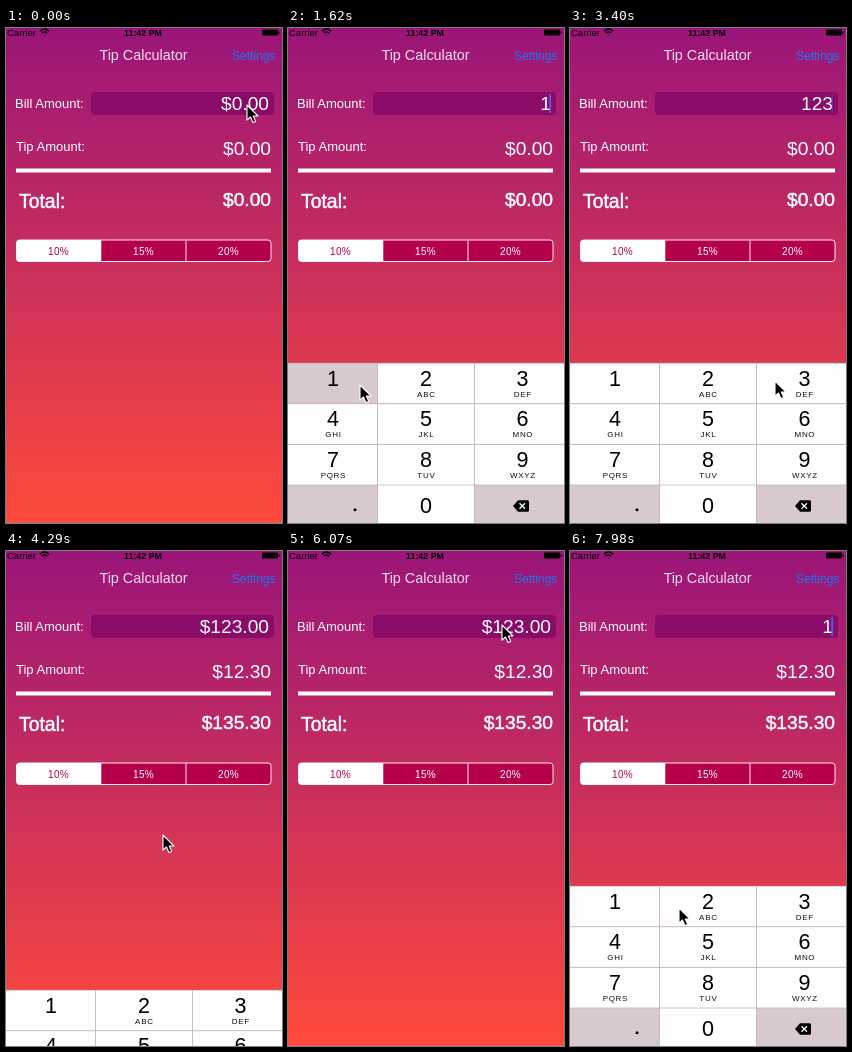
An HTML page that plays this animation: 276x495 px, repeating every 8000 ms.

```html
<!DOCTYPE html>
<html lang="en">
<head>
<meta charset="utf-8">
<title>Tip Calculator</title>
<style>
  html, body { margin: 0; width: 100%; height: 100%; overflow: hidden; background: #d63654; }
  svg { display: block; width: 100%; height: 100%; }
  text { font-family: "Liberation Sans", Arial, sans-serif; fill: #fff; }
  .end { text-anchor: end; font-size: 19.2px; }
  .mid { text-anchor: middle; }
  .medium { stroke: #fff; stroke-width: .5px; }
  .label { font-size: 13px; }
  .seg { font-size: 10px; letter-spacing: .3px; }
  .digit { font-size: 21.5px; fill: #000; }
  .letters { font-size: 8px; letter-spacing: .7px; fill: #111; }
  .status { font-size: 9.5px; fill: #000; }
</style>
</head>
<body>
<svg viewBox="0 0 276 495" preserveAspectRatio="none">
  <defs>
    <linearGradient id="sky" x1="0" y1="0" x2="0" y2="1">
      <stop offset="0" stop-color="#9a1579"/>
      <stop offset=".5" stop-color="#cb305b"/>
      <stop offset="1" stop-color="#ff4a3b"/>
    </linearGradient>
  </defs>
  <rect width="276" height="495" fill="url(#sky)"/>

  <text class="status" x="1" y="7.5">Carrier</text>
  <g fill="none" stroke="#000" stroke-width="1.4">
    <path d="M34 3.2Q38.5-1 43 3.2M35.8 5.2Q38.5 2.8 41.2 5.2"/>
    <circle cx="38.5" cy="7" r=".6" fill="#000" stroke="none"/>
  </g>
  <text class="status mid" x="137" y="7.5" style="font-size:8.9px;font-weight:bold">11:42 PM</text>
  <rect x="256" y="1.5" width="16" height="6" rx="1"/>
  <rect x="272.5" y="3.3" width="1.2" height="2.4" rx=".5"/>

  <text class="mid" x="137.5" y="32" style="font-size:14.4px;fill:#f6dcec">Tip Calculator</text>
  <text x="226" y="31.5" style="font-size:12px;fill:#1a78f0">Settings</text>

  <text class="label" x="9" y="80">Bill Amount:</text>
  <rect x="85" y="64" width="183" height="23" rx="4" fill="#8a0b68"/>
  <text class="end" id="bill" x="263" y="82"></text>
  <rect id="caret" x="261.3" y="66" width="1.7" height="19" fill="#4f62f0"/>

  <text class="label" x="10" y="123">Tip Amount:</text>
  <text class="end" id="tip" x="265" y="127"></text>
  <rect x="10" y="140.5" width="255" height="4" fill="#fff"/>
  <text class="medium" x="13" y="180" style="font-size:19.4px">Total:</text>
  <text class="end medium" id="total" x="265" y="178"></text>

  <rect x="10.5" y="212" width="254.5" height="21.5" rx="3" fill="#b5004b" stroke="#fff" stroke-width=".9"/>
  <path d="M95.3 212H13.5a3 3 0 0 0-3 3v15.5a3 3 0 0 0 3 3H95.3Z" fill="#fff"/>
  <path d="M180 212V233.5" stroke="#fff" stroke-width=".9"/>
  <text class="seg mid" x="52.5" y="226.5" style="fill:#b5004b">10%</text>
  <text class="seg mid" x="137.5" y="226.5">15%</text>
  <text class="seg mid" x="222.5" y="226.5">20%</text>

  <g id="pad"></g>

  <path id="cursor" d="M0 0V15.2L3.5 12L6 17.6L8.7 16.4L6.3 11H11Z" fill="#000" stroke="#fff" stroke-width="1.1" stroke-linejoin="round"/>
</svg>
<script>
const $ = id => document.getElementById(id);
const LOOP = 8000, STEP = 147.9, PAD_TOP = 335, PAD_HEIGHT = 160;

// Keypad, drawn at its resting place
const cols = [0, 89.5, 186.5, 276], centers = [45, 138, 234.5];
const rows = [335, 375.7, 416.4, 457, 495];
const letters = ["", "ABC", "DEF", "GHI", "JKL", "MNO", "PQRS", "TUV", "WXYZ"];

function buildPad() {
  let out = "";
  for (let i = 0; i < 12; i++) {
    const c = i % 3, r = Math.floor(i / 3);
    const grey = i === 9 || i === 11;
    out += `<rect id="key${i + 1}" x="${cols[c]}" y="${rows[r]}" width="${cols[c + 1] - cols[c]}"
      height="${rows[r + 1] - rows[r]}" fill="${grey ? "#d8c8cf" : "#fefefe"}"/>`;
    if (grey) continue;
    const digit = i === 10 ? 0 : i + 1;
    const y = i === 10 ? 485 : rows[r] + 22.5;
    out += `<text class="digit mid" x="${centers[c]}" y="${y}">${digit}</text>`;
    if (letters[i]) out += `<text class="letters mid" x="${centers[c] + .4}" y="${rows[r] + 33.7}">${letters[i]}</text>`;
  }
  out += `<path d="M0 335.3H276M0 375.7H276M0 416.4H276M0 457H276M89.5 335V495M186.5 335V495"
    stroke="#bfb8bd" stroke-width=".8"/>
    <circle cx="67" cy="481.8" r="1.5"/>
    <path d="M225 478L230 472.3H239.5Q241 472.3 241 473.8V482.2Q241 483.7 239.5 483.7H230Z"/>
    <path d="M231.5 475.3L237 480.7M237 475.3L231.5 480.7" stroke="#fff" stroke-width="1.3"/>`;
  $("pad").innerHTML = out;
}

// Pointer stops: step, x, y
const path = [
  [0, 241, 77], [4, 241, 77], [6, 190, 175], [8, 90, 335], [9, 72, 357], [11, 72, 357],
  [13, 122, 354], [15, 122, 354], [18, 217, 354], [22, 217, 354], [23, 205, 353],
  [25, 172, 313], [27, 157, 284], [36, 157, 284], [38, 172, 232], [40, 209, 96],
  [41, 214, 74], [43, 214, 74], [44, 214, 79], [46, 214, 79], [48, 150, 220],
  [50, 75, 357], [51, 75, 357], [53, 97, 357], [54, 109, 357]
];

function pointer(n) {
  let i = 0;
  while (i < path.length - 2 && path[i + 1][0] <= n) i++;
  const [a, ax, ay] = path[i], [b, bx, by] = path[i + 1];
  const k = Math.min(1, (n - a) / (b - a));
  return [ax + (bx - ax) * k, ay + (by - ay) * k];
}

const within = (n, a, b) => n >= a && n < b;
const settle = n => Math.exp(-2.5 * Math.max(0, n));

function padOffset(n) {
  if (n < 29) return PAD_HEIGHT * settle(n - 2);
  if (n < 44) return n > 30 ? PAD_HEIGHT : PAD_HEIGHT * (1 - settle(n - 28.58));
  return PAD_HEIGHT * settle(n - 44);
}

// Bill text by starting step; an empty entry shows the placeholder
const entries = [[0, "$0.00"], [3, ""], [11, "1"], [15, "12"], [19, "123"], [29, "$123.00"], [45, ""], [51, "1"]];

function caretAlpha(n) {
  if (n === 23) return .35;
  if (n === 24 || n === 25) return 0;
  return within(n, 3, 29) || n >= 45 ? 1 : 0;
}

function draw(t) {
  const n = Math.floor(t / STEP + .07);
  const bill = entries.filter(e => e[0] <= n).pop()[1];
  $("bill").textContent = bill || "$0.00";
  $("bill").style.fill = bill ? "#fff" : "#650957";
  $("caret").setAttribute("opacity", caretAlpha(n));
  $("tip").textContent = n < 29 ? "$0.00" : "$12.30";
  $("total").textContent = n < 29 ? "$0.00" : "$135.30";
  $("pad").setAttribute("transform", `translate(0 ${padOffset(n).toFixed(2)})`);
  const press = (key, on) => $("key" + key).setAttribute("fill", on ? "#d8c8cf" : "#fefefe");
  press(1, within(n, 10, 12) || within(n, 50, 52));
  press(3, within(n, 18, 20));
  $("cursor").setAttribute("transform", `translate(${pointer(n).join(" ")})`);
}

buildPad();
const start = performance.now();
function tick() {
  draw((performance.now() - start) % LOOP);
  requestAnimationFrame(tick);
}
tick();
</script>
</body>
</html>
```
